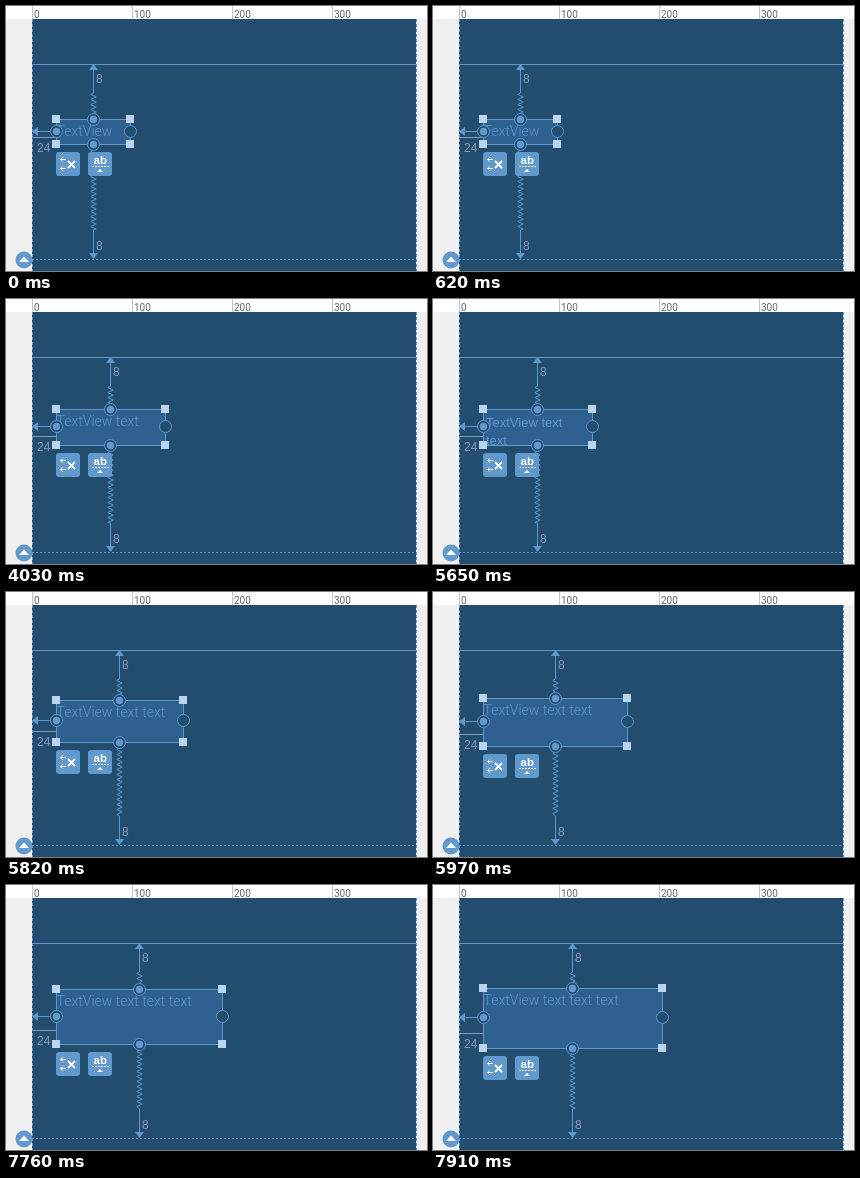
Recreate the animation shown at these times as an HTML page with a canvas. Size 421 by 265 pixels, loop 8000 ms.

```html
<!DOCTYPE html>
<html lang="en">
<head>
<meta charset="utf-8">
<title>Constraint layout blueprint</title>
<style>
html, body { margin: 0; width: 100%; height: 100%; overflow: hidden; }
canvas { display: block; }
</style>
</head>
<body>
<canvas id="stage" width="421" height="265"></canvas>
<script>
const ctx = document.getElementById('stage').getContext('2d');
const LOOP = 8000;
const BG = '#224d6e', BOX = '#2e6090', BLUE = '#6199cd', PALE = '#b9d6ee', MUTED = '#8d9bb9';
const SANS = '"Liberation Sans", Arial, sans-serif';
const LEFT = 26, RIGHT = 410, TOP = 58, BOTTOM = 253, BOX_X = 50;

// Each move widens the text box by one word
const MOVES = [
  { start: 3720, end: 4030, from: 0.1, reflow: ['TextView'] },
  { start: 5650, end: 5970, from: 0, reflow: ['TextView text', 'text'] },
  { start: 7610, end: 7910, from: 0.15 }
];

function rect(x, y, w, h, color) {
  ctx.fillStyle = color;
  ctx.fillRect(x, y, w, h);
}

function line(points, color = BLUE, dash = [], width = 1) {
  ctx.strokeStyle = color;
  ctx.lineWidth = width;
  ctx.setLineDash(dash);
  ctx.beginPath();
  points.forEach(([x, y]) => ctx.lineTo(x, y));
  ctx.stroke();
  ctx.setLineDash([]);
}

function polygon(points, color) {
  ctx.fillStyle = color;
  ctx.beginPath();
  points.forEach(([x, y]) => ctx.lineTo(x, y));
  ctx.fill();
}

function disc(x, y, r, fill, stroke) {
  ctx.beginPath();
  ctx.arc(x, y, r, 0, Math.PI * 2);
  ctx.fillStyle = fill;
  ctx.fill();
  if (stroke) {
    ctx.strokeStyle = stroke;
    ctx.lineWidth = 1;
    ctx.stroke();
  }
}

function text(str, x, y, font, color) {
  ctx.font = font;
  ctx.fillStyle = color;
  ctx.fillText(str, x, y);
}

function anchor(x, y, connected = true) {
  disc(x + 0.5, y + 0.5, 6, BG, BLUE);
  if (connected) disc(x + 0.5, y + 0.5, 3.7, BLUE);
}

function spring(x, y0, y1) {
  const points = [[x, y0]];
  for (let y = y0 + 1.5, side = -1; y < y1; y += 2.5, side = -side) points.push([x + side * 2.7, y]);
  points.push([x, y1]);
  line(points);
}

function drawStage() {
  rect(0, 0, 421, 265, '#f0f0f0');
  rect(0, 0, 421, 13, '#fff');
  rect(LEFT, 13, RIGHT - LEFT, 252, BG);
  for (let n = 0; n < 4; n++) {
    const x = LEFT + n * 100;
    rect(x, 0, 1, 13, '#c4c4c4');
    text(String(n * 100), x + 2, 12, '10px Roboto, sans-serif', '#666');
  }
  for (const x of [LEFT, RIGHT]) line([[x + 0.5, 13], [x + 0.5, 265]], BLUE, [3, 2]);
  line([[LEFT, TOP + 0.5], [RIGHT, TOP + 0.5]]);
  line([[LEFT, BOTTOM + 0.5], [RIGHT, BOTTOM + 0.5]], BLUE, [2, 2]);
  disc(18, 254, 8.5, BLUE);
  polygon([[13, 256], [18, 250.5], [23, 256]], '#fff');
}

function button(x, y) {
  ctx.fillStyle = BLUE;
  ctx.beginPath();
  ctx.roundRect(x, y, 24, 24, 3);
  ctx.fill();
}

function drawButtons(y) {
  button(50, y);
  for (const ay of [y + 7.5, y + 16.5]) {
    line([[54.5, ay], [60, ay]], '#fff');
    line([[57, ay - 2.5], [54.5, ay], [57, ay + 2.5]], '#fff');
  }
  line([[62, y + 9], [69, y + 16]], '#fff', [], 1.8);
  line([[69, y + 9], [62, y + 16]], '#fff', [], 1.8);

  button(82, y);
  text('ab', 87.5, y + 12, 'bold 11.5px ' + SANS, '#fff');
  line([[86, y + 14.5], [103, y + 14.5]], '#fff', [2, 1]);
  polygon([[91, y + 20], [94, y + 17], [97, y + 20]], '#fff');
}

function drawConstraints(cx, cy, top, bottom) {
  const x = cx + 0.5, lead = 29;
  line([[x, TOP + 4], [x, TOP + lead]]);
  spring(x, TOP + lead, top - 6);
  polygon([[x - 4.5, TOP + 6], [x, TOP], [x + 4.5, TOP + 6]], BLUE);
  spring(x, bottom + 6, BOTTOM - lead);
  line([[x, BOTTOM - lead], [x, BOTTOM - 4]]);
  polygon([[x - 4.5, BOTTOM - 6], [x, BOTTOM], [x + 4.5, BOTTOM - 6]], BLUE);
  text('8', cx + 3, 77, '12px ' + SANS, MUTED);
  text('8', cx + 3, 244, '12px ' + SANS, MUTED);

  line([[LEFT + 5, cy - 0.5], [BOX_X, cy - 0.5]]);
  polygon([[LEFT + 6, cy - 5], [LEFT, cy - 0.5], [LEFT + 6, cy + 4]], BLUE);
  const shelf = Math.floor((top + bottom) / 2 + (bottom - top) / 4);
  line([[LEFT, shelf + 0.5], [BOX_X, shelf + 0.5]], MUTED);
  text('24', 31, shelf + 15, '12px ' + SANS, MUTED);
}

function stateAt(t) {
  const moves = MOVES.filter(m => t >= m.start);
  const count = moves.length;
  if (!count) return { size: 0, words: 0 };
  const { start, end, from, reflow } = moves[count - 1];
  const step = Math.min(4, Math.floor((t - start) / (end - start) * 4));
  const u = from + (1 - from) * step / 4;
  const eased = (1 - Math.cos(Math.PI * u)) / 2;
  return { size: count - 1 + eased, words: count, reflow: step === 0 ? reflow : null };
}

function draw(t) {
  const { size, words, reflow } = stateAt(t);
  const right = Math.round(124 + 35 * size);
  const top = Math.round(113 - 10 / 3 * size);
  const bottom = Math.floor(138 + 25 / 3 * size + 1e-6);
  const cx = Math.floor((BOX_X + right) / 2);
  const cy = Math.ceil((top + bottom) / 2);
  const w = right - BOX_X, h = bottom - top;

  drawStage();
  drawConstraints(cx, cy, top, bottom);

  rect(BOX_X, top, w, h, BOX);
  ctx.save();
  ctx.beginPath();
  ctx.rect(BOX_X, top, w, h);
  ctx.clip();
  if (reflow) reflow.forEach((row, i) => text(row, 53, top + 18 + i * 18, '13px ' + SANS, BLUE));
  else text('TextView' + ' text'.repeat(words), 50.5, top + 17, '300 14px Roboto, sans-serif', BLUE);
  ctx.restore();
  ctx.strokeStyle = BLUE;
  ctx.lineWidth = 1;
  ctx.strokeRect(BOX_X + 0.5, top + 0.5, w, h);

  for (const x of [BOX_X, right]) for (const y of [top, bottom]) rect(x - 4, y - 4, 8, 8, PALE);
  anchor(BOX_X, cy - 1);
  anchor(right, cy - 1, false);
  anchor(cx, top);
  anchor(cx, bottom);
  drawButtons(bottom + 8);
}

function tick() {
  draw(performance.now() % LOOP);
  requestAnimationFrame(tick);
}
tick();
</script>
</body>
</html>
```
